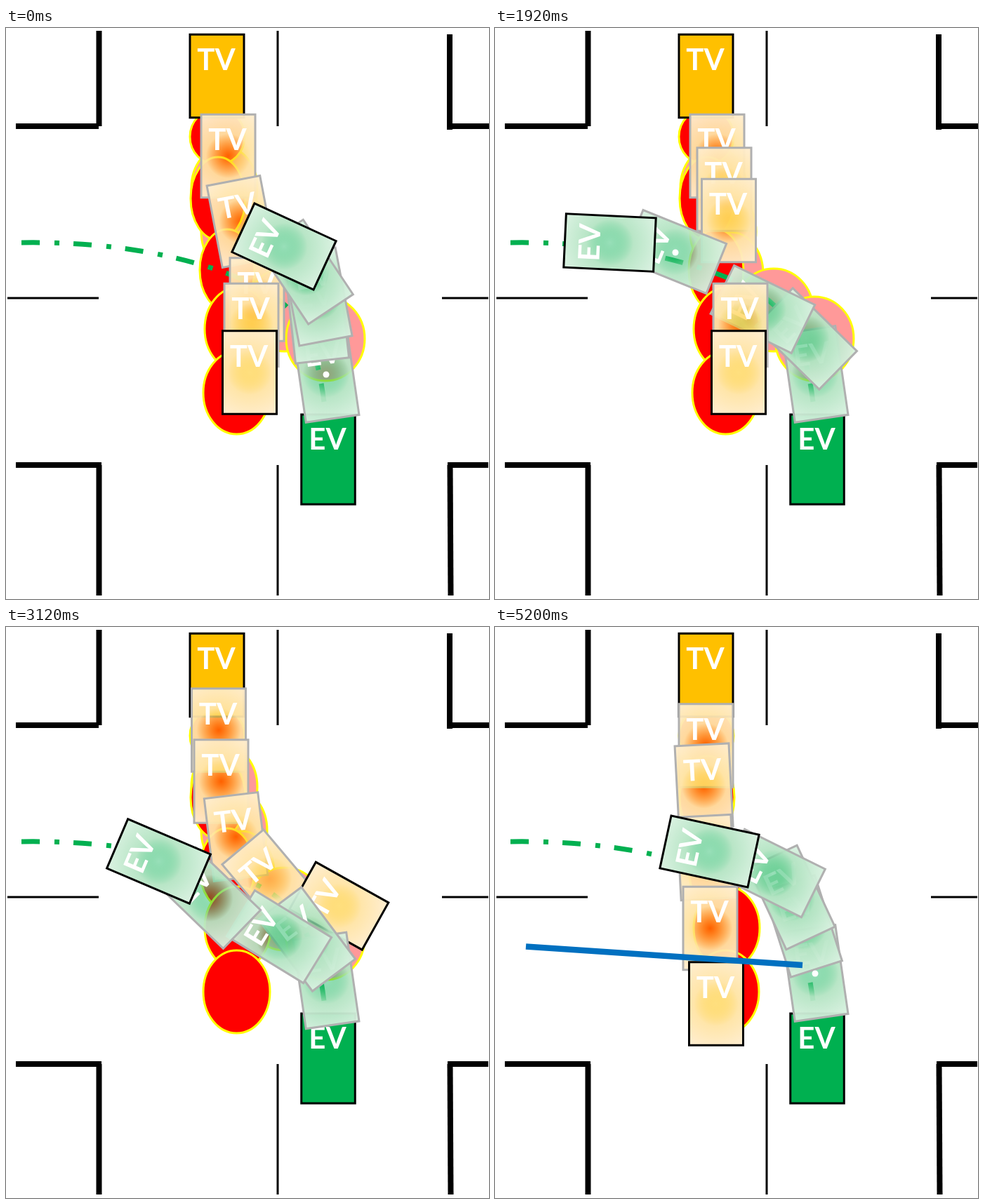
An HTML page with a canvas for the animation above (6 s loop, 688 by 814 pixels).

```html
<!DOCTYPE html>
<html lang="en">
<head>
<meta charset="utf-8">
<title>Intersection scenarios</title>
<style>
  html, body { margin: 0; width: 688px; height: 814px; overflow: hidden; background: #fff; }
  canvas { display: block; }
</style>
</head>
<body>
<canvas id="stage" width="688" height="814"></canvas>
<script>
const ctx = document.getElementById('stage').getContext('2d');

const KINDS = {
  TV: { w: 77, h: 118.5, solid: '#ffc000', baseline: -8.5,
        fade: ['rgba(255,192,0,.5)', 'rgba(255,228,165,.95)', 'rgba(255,238,210,.97)'] },
  EV: { w: 76.5, h: 128, solid: '#00b050', baseline: -14,
        fade: ['rgba(0,176,80,.4)', 'rgba(180,228,195,.94)', 'rgba(219,242,226,.96)'] }
};

const car = kind => (x, y, angle = 0) => ({ kind, x, y, angle });
const tv = car('TV'), ev = car('EV');
const last = c => ({ ...c, final: true });

// Poses shared by several scenarios
const tvStart = tv(316.5, 182.5), tvLate = tv(349.5, 423.5), tvEnd = last(tv(347, 491));
const evStart = ev(456, 493.5, -8.2);
const tvKeep = [tv(300.5, 169), tv(297.6, 227, -3)], tvThird = tv(300.5, 328.5, -3);
const evSecond = ev(438.5, 426.5, -17.7), evThird = ev(422.5, 385.5, -25);
const evFourth = ev(396, 351, -63.7);

// Cars are listed in painting order
const scenes = [
  { ms: 1200, pink: true, dot: [456, 494], cars: [
    tvStart, tv(335, 276, -10.8), tv(357.5, 387), tvLate, tvEnd,
    evStart, ev(443.5, 410.4, -6.3), ev(443.5, 383, -10.8), ev(427, 347.7, -33.7),
    last(ev(396, 311.5, -65.2))] },
  { ms: 1200, pink: true, dot: [257, 320], cars: [
    tvStart, tv(326.5, 230), tv(333, 274.5),
    evStart, ev(443, 443, -45.5), ev(381.4, 401, -64), tvLate, tvEnd,
    ev(256, 319, -68), last(ev(163.5, 306, -87.3))] },
  { ms: 1200, pink: true, cars: [
    tv(303, 147), tv(306.5, 220), tv(327.5, 299, -6.8), tv(375.5, 359, -40.1),
    last(tv(474.3, 397.6, -60.8)),
    ev(456, 504, -8.2), ev(428.6, 445, -36.9), ev(389, 441.6, -58.5), ev(290, 386.5, -46),
    last(ev(217.5, 334, -66.9))] },
  { ms: 800, dot: [456, 494], bar: [333, 125, 356.5, 559], cars: [
    ...tvKeep, last(tvThird), evStart, evSecond, last(evThird)] },
  { ms: 800, dot: [456, 494], bar: [174, 290, 549, 474], cars: [
    ...tvKeep, tvThird, last(tv(303.5, 432)),
    evStart, evSecond, evThird, last(evFourth)] },
  { ms: 800, dot: [456, 494], bar: [44, 455.5, 438, 482], cars: [
    ...tvKeep, tvThird, tv(306.5, 429.5), last(tv(315, 537)),
    evStart, evSecond, evThird, evFourth, last(ev(305.5, 320, -77.8))] }
];
const loop = scenes.reduce((sum, s) => sum + s.ms, 0);

function line(x1, y1, x2, y2, width, color = '#000') {
  ctx.lineWidth = width;
  ctx.strokeStyle = color;
  ctx.beginPath();
  ctx.moveTo(x1, y1);
  ctx.lineTo(x2, y2);
  ctx.stroke();
}

function disc(x, y, rx, ry, fill, outline) {
  ctx.beginPath();
  ctx.ellipse(x, y, rx, ry, 0, 0, 2 * Math.PI);
  ctx.fillStyle = fill;
  ctx.fill();
  if (!outline) return;
  ctx.lineWidth = 3;
  ctx.strokeStyle = outline;
  ctx.stroke();
}

function drawRoad() {
  line(132.5, 4, 132.5, 140, 8);
  line(14, 140, 132, 140, 8);
  line(632, 9, 632, 145, 8);
  line(632, 140, 688, 140, 8);
  line(14, 623, 136, 623, 8);
  line(132.5, 623, 132.5, 809, 8);
  line(629, 623, 687, 623, 8);
  line(632.5, 623, 633.5, 809, 8);
  line(387, 4, 387, 140, 3);
  line(387, 623, 387, 809, 3);
  line(2, 385, 132, 385, 3);
  line(621, 385, 687, 385, 3);
}

function drawZones(pink) {
  const zone = color => ([x, y, rx, ry]) => disc(x, y, rx, ry, color, '#ff0');
  if (pink) {
    [[311, 228, 47, 59], [325, 290, 47, 59], [335, 350, 47, 59],
     [397, 402, 56, 59], [455, 443, 56, 60]].forEach(zone('#f99'));
  }
  [[301, 155, 39, 40], [302, 243, 39, 59], [315, 345, 39, 58],
   [330, 429, 47, 59], [328.5, 520, 47.5, 59]].forEach(zone('#f00'));
}

function drawRoute() {
  ctx.setLineDash([26, 21, 7, 20]);
  ctx.lineWidth = 7;
  ctx.strokeStyle = '#00b050';
  ctx.beginPath();
  ctx.moveTo(22, 306);
  ctx.bezierCurveTo(150, 304, 270, 325, 360, 369);
  ctx.bezierCurveTo(420, 400, 445, 450, 455, 551);
  ctx.stroke();
  ctx.setLineDash([]);
}

function drawCar({ kind, x, y, angle, final, solid }) {
  const k = KINDS[kind], box = [-k.w / 2, -k.h / 2, k.w, k.h];
  ctx.save();
  ctx.translate(x, y);
  ctx.rotate(angle * Math.PI / 180);
  if (final) {
    ctx.fillStyle = '#fff';
    ctx.fillRect(...box);
  }
  const fade = ctx.createRadialGradient(0, 0, 0, 0, 0, Math.hypot(k.w, k.h) / 2);
  [0, 0.45, 1].forEach((stop, i) => fade.addColorStop(stop, k.fade[i]));
  ctx.fillStyle = solid ? k.solid : fade;
  ctx.fillRect(...box);
  ctx.lineWidth = 3;
  ctx.strokeStyle = final || solid ? '#000' : '#b0b0b0';
  ctx.strokeRect(...box);
  ctx.fillStyle = '#fff';
  ctx.font = 'bold 42px Lato, sans-serif';
  ctx.textAlign = 'center';
  ctx.fillText(kind, -1, k.baseline);
  ctx.restore();
}

function drawScene({ pink, dot, bar, cars }) {
  ctx.fillStyle = '#fff';
  ctx.fillRect(0, 0, 688, 814);
  drawRoad();
  drawZones(pink);
  drawRoute();
  drawCar({ ...tv(300.5, 68.5), solid: true });
  drawCar({ ...ev(459, 615), solid: true });
  cars.forEach(drawCar);
  if (dot) disc(...dot, 4.5, 4.5, '#fff');
  if (bar) line(...bar, 8.5, '#0070c0');
}

function frame(now) {
  let t = now % loop, i = 0;
  while (t >= scenes[i].ms) t -= scenes[i++].ms;
  drawScene(scenes[i]);
  requestAnimationFrame(frame);
}
frame(performance.now());
</script>
</body>
</html>
```
